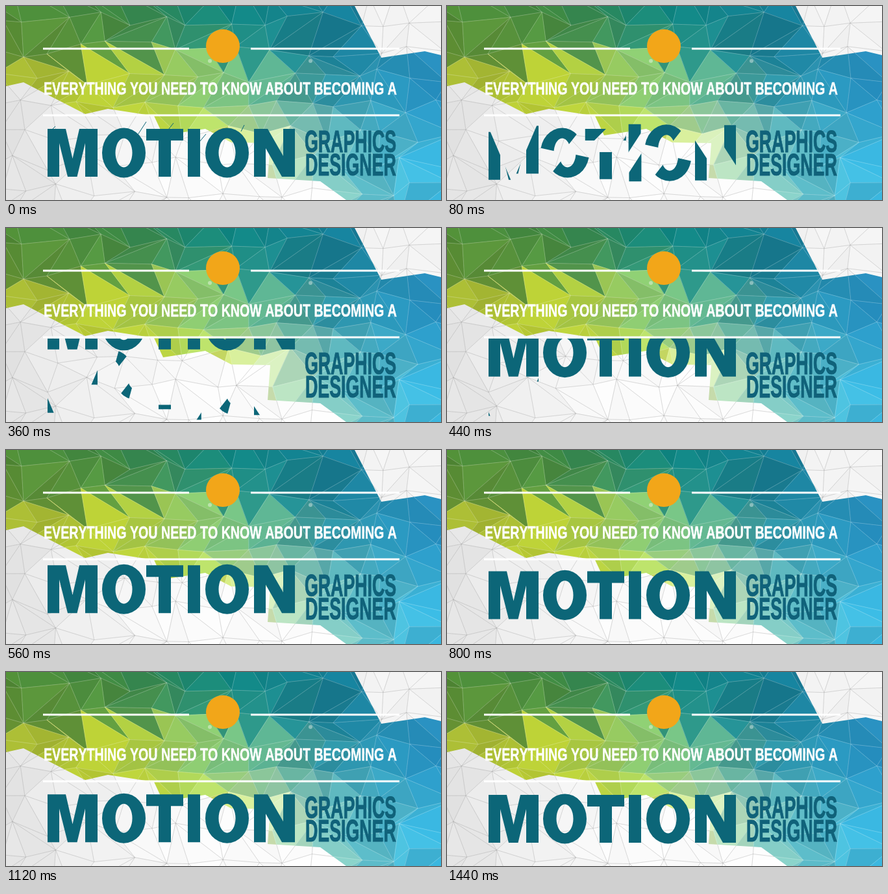
An HTML page with a canvas for the animation above (1480 ms loop, 670 by 300 pixels).

```html
<!DOCTYPE html>
<html lang="en">
<head>
<meta charset="utf-8">
<title>Motion Graphics Designer</title>
<style>
html, body { margin: 0; width: 100%; height: 100%; overflow: hidden; background: #fff; }
canvas, svg { position: absolute; left: 0; top: 0; width: 670px; height: 300px; display: block; }
text { font: bold 27px "Liberation Sans", Arial, sans-serif; font-kerning: none; fill: #fff; stroke: #fff; stroke-width: .5px; }
.big { font-size: 49px; fill: #10627a; stroke: #10627a; stroke-width: 1.2px; }
.word { fill: #0c6678; }
</style>
</head>
<body>
<canvas id="mesh" width="670" height="300"></canvas>
<svg viewBox="0 0 670 300">
  <defs>
    <clipPath id="below"><rect y="171" width="670" height="129"/></clipPath>
    <path id="M" d="M64 264V190H92L102.5 236 113 190H141V264H122V212L109.5 264H95L82 212V264Z"/>
    <path id="O" fill-rule="evenodd" d="M148 227a33.5 38.5 0 1 1 67 0a33.5 38.5 0 1 1 -67 0ZM168.500 227a13 22.500 0 1 0 26 0a13 22.500 0 1 0 -26 0Z"/>
    <path id="T" d="M216 190H273V208H254V264H235V208H216Z"/>
    <path id="I" d="M280 190H299V264H280Z"/>
    <use id="P" href="#O" x="159"/>
    <path id="N" d="M382 264V190H403L427 232V190H445V264H425L400 220V264Z"/>
  </defs>
  <path d="M57 66H282M377 66H606M57 169H606" stroke="#fff" stroke-width="3"/>
  <circle cx="334" cy="62" r="26" fill="#f2a619"/>
  <text transform="translate(58 137) scale(.727 1)">EVERYTHING YOU NEED TO KNOW ABOUT BECOMING A</text>
  <text class="big" transform="translate(460 225.500) scale(.546 1)">GRAPHICS</text>
  <text class="big" transform="translate(461 262) scale(.546 1)">DESIGNER</text>
  <g class="word" clip-path="url(#below)" role="img" aria-label="MOTION">
    <g id="word">
      <use href="#M"/><use href="#O"/><use href="#T"/><use href="#I"/><use href="#P"/><use href="#N"/>
    </g>
    <g id="shards"></g>
  </g>
  <path id="cracks" d="M70 192l6-6M203 199l13-20M247 195l11-14M298 210l10-12M362 194l5-10" stroke="#0c6678"/>
</svg>
<script>
const $ = id => document.getElementById(id);
const LOOP = 1480, BREAK = 40, DROP = 300, GONE = 480;
const clamp = v => Math.max(0, Math.min(1, v));
const polar = (deg, r) => [r * Math.cos(deg * Math.PI / 180), r * Math.sin(deg * Math.PI / 180)];

// ---------- faceted backdrop ----------
const g = $('mesh').getContext('2d');
let seed = 11;
const rnd = () => (seed = (seed * 16807) % 2147483647) / 2147483647;

const mix = (a, b, k) => a.map((v, i) => v + (b[i] - v) * k);
const css = rgb => `rgb(${rgb.map(v => Math.min(255, v | 0))})`;

// Evenly spaced colour keys across the stage
function ramp(keys) {
  const rgb = keys.split(' ').map(h => [0, 2, 4].map(i => parseInt(h.slice(i, i + 2), 16)));
  return x => {
    const u = clamp(x / 670) * (rgb.length - 1), i = Math.min(u | 0, rgb.length - 2);
    return mix(rgb[i], rgb[i + 1], u - i);
  };
}
const top3 = ramp('4f8a36 3c8744 0f8580 147c94 2a88b4');
const middle = ramp('a2b233 b6cb35 7cc27c 2f93a4 2590c4');
const bottom = ramp('c8d838 c8d838 cfe03c d4eabc 62bcc4 35b4e0');

function tone(x, y, shade) {
  const ridge = 92 - 20 * Math.exp(-(((x - 270) / 80) ** 2));
  const rgb = y < ridge
    ? mix(top3(x), middle(x), .35 * clamp(y / ridge))
    : mix(middle(x), bottom(x), clamp((y - 140) / 70));
  return css(rgb.map(v => v * shade));
}

function paper(x, y, shade) {
  const dark = y < 100 ? 8 : 24 * clamp(1 - x / 260);
  return css(Array(3).fill(252 - dark + (shade - 1) * 50));
}

const cols = 15, rows = 8, pts = [];
for (let r = 0; r <= rows; r++)
  for (let c = 0; c <= cols; c++)
    pts.push([(c - .7 + r % 2 * .4) * 50 + (rnd() - .5) * 28, (r - .5) * 44 + (rnd() - .5) * 26]);

const tris = [];
for (let r = 0; r < rows; r++)
  for (let c = 0; c < cols; c++) {
    const a = r * (cols + 1) + c, b = a + 1, d = a + cols + 1, e = d + 1;
    const pair = rnd() < .5 ? [[a, b, d], [b, e, d]] : [[a, b, e], [a, e, d]];
    for (const t of pair) tris.push({ p: t.map(i => pts[i]), shade: .93 + rnd() * .14 });
  }

function facets(color, line) {
  g.lineWidth = .7;
  for (const edges of [false, true])
    for (const { p, shade } of tris) {
      const [x, y] = [0, 1].map(i => (p[0][i] + p[1][i] + p[2][i]) / 3);
      g.beginPath();
      p.forEach(q => g.lineTo(...q));
      g.closePath();
      g.fillStyle = color(x, y, shade);
      g.strokeStyle = edges ? line : g.fillStyle;
      if (!edges) g.fill();
      g.stroke();
    }
}

facets(paper, 'rgba(150,150,150,.28)');
g.save();
g.clip(new Path2D(`M0 0H537L578 80 645 70 670 76V300H524L484 271 403 266 407 212 347 211
  307 190 242 200 228 170 157 159 122 167 27 118 0 124Z`));
facets(tone, 'rgba(255,255,255,.17)');
g.restore();
g.fillStyle = 'rgba(255,255,255,.4)';
for (const x of [314, 469]) {
  g.beginPath();
  g.arc(x, 85, 3, 0, 7);
  g.fill();
}

// ---------- shattering word ----------
const MID = 227;
const shards = [];

// A piece is the part of a letter inside a wedge whose tip runs outwards along dir.
// reach and drift hold at 200 ms; speed and spin are per 160 ms.
function shard(id, x, dir, reach, speed, drift, half = 90, spin = 0) {
  const box = $('shards'), clip = `cut${shards.length}`;
  box.insertAdjacentHTML('beforeend',
    `<clipPath id="${clip}"><polygon/></clipPath><g><use href="#${id}" clip-path="url(#${clip})"/></g>`);
  const node = box.lastElementChild;
  shards.push({ x, dir, reach, speed, drift, half, spin, node, cut: $(clip).firstElementChild });
}

// Two opposite pieces flying apart
function split(id, x, dir, reach, speed, [dx, dy], half, spin, other = dir + 180) {
  shard(id, x, dir, reach, speed, [dx, dy], half, spin);
  shard(id, x, other, reach, speed, [-dx, -dy], half, spin);
}

split('M', 102.5, 157, 28, 13, [0, 12], 90, 0, 23);
split('O', 181.5, -90, 0, 0, [-10, 0], 38, 53);
split('I', 289.5, 33, 12, 10, [1, 18]);
split('P', 340.5, -90, 0, 0, [-6, -13], 38, 53);
split('N', 413.5, -33, 24, 15, [0, -14]);
shard('T', 244.5, 225, 34, 14, [-8, 0]);
shard('T', 260, 0, 8, 14, [7, 0], 60);
shard('T', 244.5, 90, 10, 20, [0, 9]);

function shatter(t) {
  const step = (t - 200) / 160;
  for (const s of shards) {
    const tip = polar(s.dir, s.reach + s.speed * step);
    const from = s.dir - s.half + s.spin * step, to = s.dir + s.half;
    const rim = [0, .25, .5, .75, 1].map(k => polar(from + (to - from) * k, to > from ? 300 : 0));
    s.cut.setAttribute('points', [[0, 0], ...rim].map(p => [p[0] + tip[0] + s.x, p[1] + tip[1] + MID]).join(' '));
    s.node.setAttribute('transform', `translate(${s.drift.map(d => d * t / 200)})`);
  }
}

// Height above rest while the word drops in: a fast and a slow decay
function lift(t) {
  const d = t - 360;
  return (69 * Math.exp(-d / 90) + 8 * Math.exp(-d / 330)) * clamp((LOOP - t) / 300);
}

const show = (id, on) => $(id).setAttribute('visibility', on ? 'visible' : 'hidden');
const start = performance.now();

function draw() {
  const t = (performance.now() - start) % LOOP;
  const whole = t < BREAK, drop = t >= DROP, broken = !whole && t < GONE;
  show('cracks', whole);
  show('word', whole || drop);
  show('shards', broken);
  $('word').setAttribute('transform', `translate(0 ${drop ? -lift(t) : 0})`);
  if (broken) shatter(t);
  requestAnimationFrame(draw);
}
draw();
</script>
</body>
</html>
```
